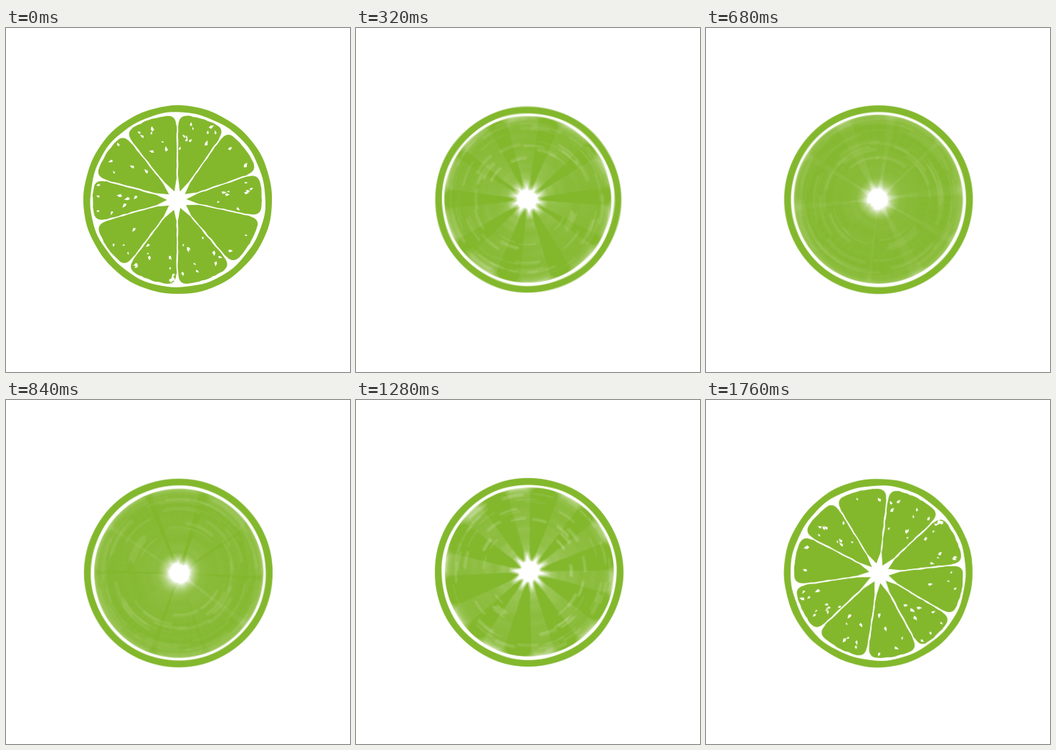
An HTML page with a canvas for the animation above (2720 ms loop, 480 px wide and 480 px high).

```html
<!DOCTYPE html>
<html lang="en">
<head>
<meta charset="utf-8">
<title>Spinning lime</title>
<style>
  html, body { margin: 0; width: 100%; height: 100%; overflow: hidden; background: #fff; }
  canvas { display: block; }
</style>
</head>
<body>
<canvas id="stage" width="480" height="480"></canvas>
<script>
const GREEN = '#83b82d';
const SIZE = 480, PIVOT = 240.4, CENTER = 239.7;
const TAU = Math.PI * 2, DEG = Math.PI / 180;
const LOOP = 2720, STEP = 40, SETTLE = 1760;
const CROUCH = 160, FULL_SPEED = 440;
const BLUR_GROUPS = 6, BLUR_SAMPLES = 6;

// Bearing of each membrane, and how flecked the segment after it is
const membranes = [0, 35, 71, 102, 140, 180, 217, 254, 285, 321.5];
const flecks = [11, 2, 9, 2, 10, 12, 4, 8, 5, 7];

function seeded(seed) {
  return () => (seed = (seed * 16807) % 2147483647) / 2147483647;
}
const rand = seeded(4242);
const spread = size => (rand() - 0.5) * size;

function makeCanvas(size) {
  const c = document.createElement('canvas');
  c.width = c.height = size;
  return c;
}

// Bearing in degrees clockwise from the top; shift moves sideways in pixels
function polar(r, deg, shift = 0) {
  const a = (deg - 90) * DEG;
  return [r * Math.cos(a) - shift * Math.sin(a), r * Math.sin(a) + shift * Math.cos(a)];
}

function wobblyCircle(g, radius, wobble, phase) {
  g.beginPath();
  for (let i = 0; i < 180; i++) {
    const a = i * 2;
    const wave = Math.sin(a * 7 * DEG + phase) + 0.6 * Math.sin(a * 17 * DEG + phase * 2);
    g.lineTo(...polar(radius + wobble * wave, a));
  }
  g.fill();
}

function segment(g, from, to) {
  const R = 118, corner = 13;
  const side = (deg, dir, r) => g.lineTo(...polar(r, deg, dir * (1 + spread(0.9))));
  g.beginPath();
  g.moveTo(...polar(14 + spread(4), (from + to) / 2));
  for (let r = 30; r < R - corner; r += 6) side(from, 1, r);
  g.lineTo(...polar(R - corner, from, 1.6));
  g.quadraticCurveTo(...polar(R - 2, from, 2.4), ...polar(R - 1, from, corner - 2));
  for (let a = from + 7; a < to - 6; a += 2) g.lineTo(...polar(R + spread(0.9), a));
  g.lineTo(...polar(R - 1, to, 2 - corner));
  g.quadraticCurveTo(...polar(R - 2, to, -2.4), ...polar(R - corner, to, -1.6));
  for (let r = R - corner - 3; r >= 30; r -= 6) side(to, -1, r);
  g.fill();
}

function fleck(g, r, deg, len) {
  g.save();
  g.translate(...polar(r, deg));
  g.rotate((deg - 90) * DEG + spread(1.6));
  g.beginPath();
  g.moveTo(-len * 0.6, -len * 0.1);
  g.lineTo(-len * 0.1, -len * (0.2 + 0.25 * rand()));
  g.lineTo(len * 0.6, -len * 0.15);
  g.lineTo(-len * 0.2, len * 0.35);
  g.fill();
  g.restore();
}

function drawLime() {
  const c = makeCanvas(SIZE * 2), g = c.getContext('2d');
  g.scale(2, 2);
  g.fillStyle = '#fff';
  g.fillRect(0, 0, SIZE, SIZE);
  g.translate(CENTER, CENTER);
  g.fillStyle = GREEN;
  wobblyCircle(g, 131.6, 0.3, 1);
  g.fillStyle = '#fff';
  wobblyCircle(g, 122.2, 0.45, 2);

  g.translate(-0.7, 0);
  membranes.forEach((from, i) => {
    const to = membranes[i + 1] ?? 360;
    g.fillStyle = GREEN;
    segment(g, from, to);
    g.fillStyle = '#fff';
    for (let k = 0; k < flecks[i]; k++) {
      const r = 45 + 68 * Math.sqrt(rand());
      fleck(g, r, (from + to) / 2 + spread(to - from - 6), 3 + rand() * 4);
    }
  });
  return c;
}

function smooth(x) {
  x = Math.min(1, Math.max(0, x));
  return x * x * (3 - 2 * x);
}

// Small wind-up, burst of speed, long slow-down
function angleAt(t) {
  if (t < CROUCH) return -3 * smooth(t / CROUCH);
  if (t < FULL_SPEED) return -3 + 148 * ((t - CROUCH) / (FULL_SPEED - CROUCH)) ** 2.5;
  const left = Math.max(0, (SETTLE - t) / (SETTLE - FULL_SPEED));
  return 946.6 - 801.6 * left ** 2.15;
}

function scaleAt(t) {
  const dip = t < CROUCH ? smooth(t / CROUCH) : 1 - smooth((t - CROUCH) / 240);
  return 1 - 0.053 * dip;
}

const lime = drawLime();
const stage = document.getElementById('stage').getContext('2d');
const layer = makeCanvas(SIZE), layerCtx = layer.getContext('2d');
layerCtx.imageSmoothingQuality = 'high';

function paintLime(g, t) {
  const s = scaleAt(t);
  g.save();
  g.translate(PIVOT, PIVOT);
  g.rotate(angleAt(t) * DEG);
  g.scale(s, s);
  g.beginPath();
  g.arc(0, 0, 136, 0, TAU);
  g.clip();
  g.drawImage(lime, -PIVOT, -PIVOT, SIZE, SIZE);
  g.restore();
}

// Running mean of n paintings
function average(g, n, paint) {
  for (let i = 0; i < n; i++) {
    g.globalAlpha = 1 / (i + 1);
    paint(i);
  }
  g.globalAlpha = 1;
}

function render(t) {
  const still = t === 0 || t >= SETTLE;
  const groups = still ? 1 : BLUR_GROUPS, samples = still ? 1 : BLUR_SAMPLES;
  const total = groups * samples;
  average(stage, groups, j => {
    layerCtx.fillStyle = '#fff';
    layerCtx.fillRect(0, 0, SIZE, SIZE);
    average(layerCtx, samples, i => {
      const shutter = still ? 0 : ((i * groups + j + 0.5) / total - 0.5) * STEP;
      paintLime(layerCtx, t + shutter);
    });
    stage.drawImage(layer, 0, 0);
  });
}

const start = performance.now();
let shown = -1;

function tick() {
  const now = Math.max(0, performance.now() - start) % LOOP;
  const t = Math.min(SETTLE, Math.floor(now / STEP) * STEP);
  if (t !== shown) render(shown = t);
  requestAnimationFrame(tick);
}
tick();
</script>
</body>
</html>
```
